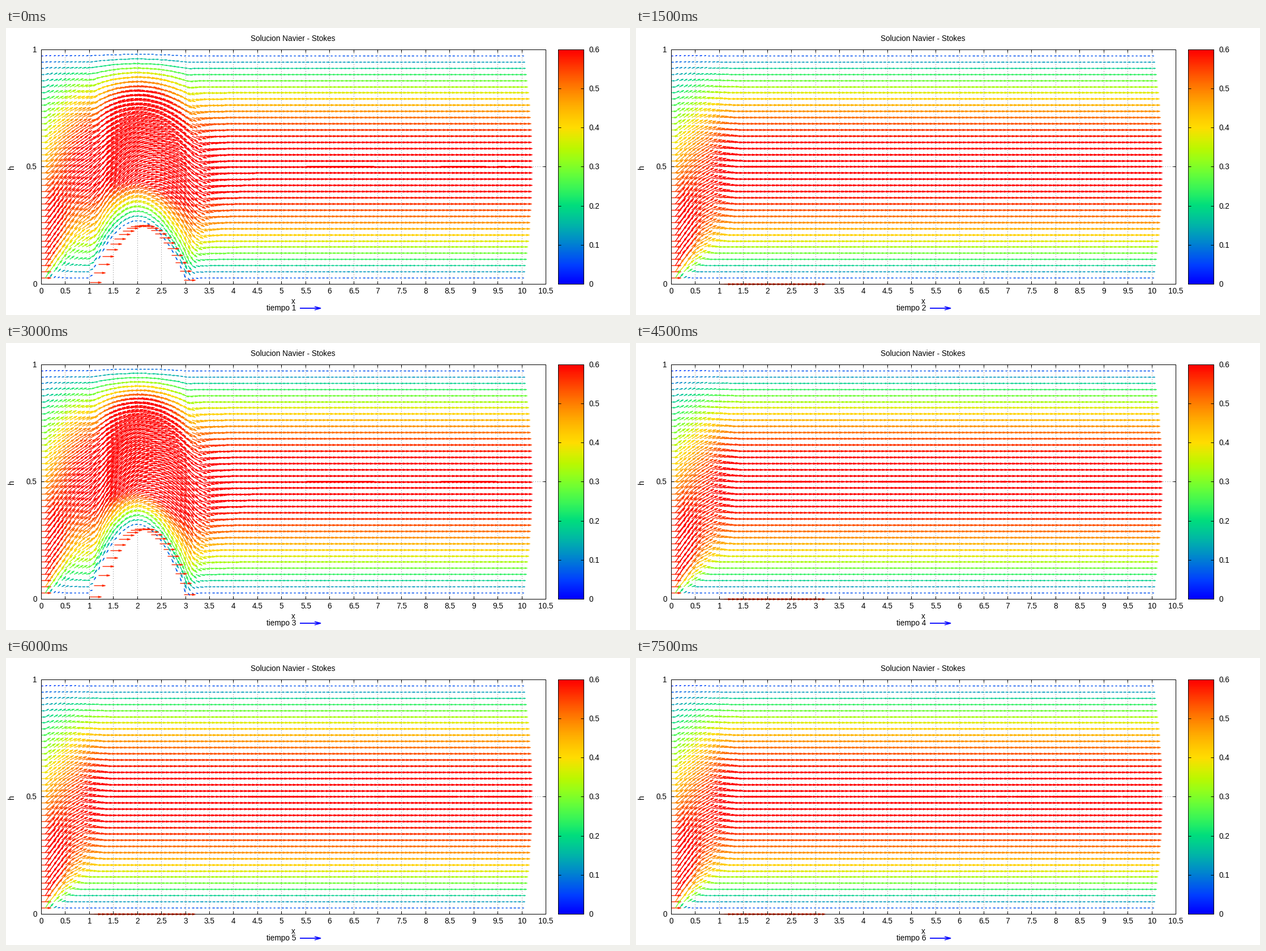
Recreate the animation shown at these times as a matplotlib script. Size 1102 px wide and 508 px high, loop 8 s.

```python
import numpy as np
import matplotlib.pyplot as plt
from matplotlib.animation import FuncAnimation
from matplotlib.collections import LineCollection, PolyCollection
from matplotlib.colors import ListedColormap

W, H, DPI = 1102, 508, 64
PX = 72 / DPI                      # one pixel in points
LEFT, RIGHT, TOP, BASE = 62.5, 953.5, 38.5, 453.5
BAR_L, BAR_R = 975.5, 1020.5
SX, SY = (RIGHT - LEFT) / 10.5, BASE - TOP
ROWS, COLS = 38, 118
U_MAX, S_MAX = 0.625, 0.6
BUMP = {0: 0.25, 2: 0.30}          # obstacle height by time step

# Stretches of the centre line that look solid, in pixels
FLAT = [(190, 310), (428, 548)]
SOLID = [
    [(531, 650), (768, 848), (868, 882), (892, 907)],
    FLAT + [(638, 670), (712, 728), (785, 850)],
    [(531, 650), (768, 866)],
    FLAT + [(646, 654), (680, 686), (709, 717), (738, 752), (785, 885), (899, 922)],
    FLAT + [(655, 664), (678, 798), (814, 826), (848, 915)],
    FLAT + [(638, 654), (670, 712), (735, 850), (863, 872)],
]

plt.rcParams["font.family"] = "Liberation Sans"


def to_x(x):
    return LEFT + SX * x


def to_y(y):
    return BASE - SY * y


def pixel(v):
    """Centre of the pixel that holds v."""
    return np.ceil(v) - 0.5


def palette(speed):
    t = np.clip(np.asarray(speed) / S_MAX, 0, 1)
    rgb = [3 * t - 1, np.sin(np.pi * t), 1.16 - 2 * t]
    return np.clip(np.stack(rgb, axis=-1), 0, 1)


def flow(height):
    """Start points, speeds and on-screen slopes of the channel flow."""
    x, eta = np.meshgrid(np.arange(COLS + 1) * 10 / COLS,
                         np.arange(1, ROWS) / ROWS, indexing="ij")
    over = (x > 1) & (x < 3)
    h = np.where(over, height * (1 - (x - 2) ** 2), 0)
    y = h + eta * (1 - h)
    core = 4 * eta * (1 - eta)
    developed = U_MAX / (1 - h) * core

    # inlet zone: fast low jet that rises and relaxes to the parabola
    reach = 1.35 * (1 - np.exp(-(eta + 0.02) / 0.12))
    settle, bend = (0.7, 1.3) if height else (1, 1)
    inlet = 0.85 * (1 - eta) ** 0.85
    jet = inlet * (1 - np.exp(-eta / 0.045))
    mix = (1 - np.clip(x / reach / settle, 0, 1) ** 1.3) ** 2
    speed = developed + (jet - developed) * mix
    fade = 0.5 + 0.5 * np.cos(np.pi * np.clip(x / reach / bend, 0, 1) ** 1.3)
    slope = np.tan(np.radians(60 * (1 - eta) ** 0.45 * fade))

    # obstacle: the core lags behind the mesh, with tails on both sides
    if height:
        edge = 2 * height * (1 - eta) * SY / SX
        lag = 0.2 * core
        before = slope + 0.25 * edge * core * np.exp(np.minimum(x - 1, 0) / 0.3)
        along = edge * (2 - x + lag)
        entry = np.exp(-np.maximum(x - 1, 0) / 0.12)
        along += (before - along) * entry
        after = edge * (lag - 1) * np.exp(-(x - 3) / (0.06 + 0.18 * core))
        slope = np.where(over, along, np.where(x < 2, before, after))

    speed[0] = np.minimum(inlet[0], 0.57)
    slope[0] = 0
    return x.ravel(), y.ravel(), speed.ravel(), slope.ravel()


def arrows(height):
    x, y, speed, slope = flow(height)
    wall = np.arange(12, 36) * 10 / COLS
    x = np.concatenate([x, wall])
    y = np.concatenate([y, height * (1 - (wall - 2) ** 2)])
    reach = np.concatenate([27 * speed, np.full(wall.size, 18.2)])
    speed = np.concatenate([speed, np.full(wall.size, 0.57)])
    slope = np.concatenate([slope, np.zeros(wall.size)])

    origin = np.column_stack([to_x(x), to_y(y)])
    unit = np.column_stack([np.ones_like(slope), -slope])
    unit /= np.hypot(*unit.T)[:, None]
    length = reach * np.sqrt(1 + slope ** 2) + 1.8
    start = pixel(origin)
    tip = pixel(origin + unit * length[:, None])
    step = tip - start
    size = np.maximum(np.hypot(*step.T), 1)[:, None]
    unit = step / size
    side = unit[:, ::-1] * [-1, 1]
    head = np.minimum(5.5, 0.45 * size)
    back = tip - unit * head
    wing = side * head * 0.3
    shafts = np.stack([start, tip], axis=1)
    heads = np.stack([tip, back + wing, back - wing], axis=1)
    return shafts, heads, palette(speed)


fig = plt.figure(figsize=(W / DPI, H / DPI), dpi=DPI, facecolor="white")
ax = fig.add_axes([0, 0, 1, 1])
ax.axis("off")


def line(xs, ys, width=1, color="black", z=5, **kw):
    kw.setdefault("solid_capstyle", "butt")
    ax.plot(xs, ys, lw=width * PX, color=color, zorder=z, snap=False, **kw)


def label(x, y, text, ha="center", **kw):
    kw.setdefault("va", "baseline")
    return ax.text(x, y, text, ha=ha, fontsize=13.6 * PX, zorder=6, **kw)


def box(x0, x1):
    line([x0, x1, x1, x0, x0], [BASE, BASE, TOP, TOP, BASE],
         solid_joinstyle="miter", solid_capstyle="projecting")


DOTS = dict(color="#a0a0a0", z=1, linestyle=(0, (1.5, 2.5)))
ramp = ListedColormap(palette(np.linspace(0, S_MAX, 256)))
ax.imshow(np.linspace(0, 1, 416)[::-1, None], cmap=ramp, aspect="auto",
          extent=(BAR_L, BAR_R, BASE, TOP), zorder=1)

for k in range(22):
    px = pixel(to_x(k / 2))
    if 0 < k < 21:
        line([px, px], [BASE, TOP], **DOTS)
        line([px, px], [BASE, BASE - 5])
        line([px, px], [TOP, TOP + 5])
    label(px, 470.5, f"{k / 2:g}")

mid = pixel(to_y(0.5))
line([LEFT, RIGHT], [mid, mid], **DOTS)
line([LEFT, LEFT + 5], [mid, mid])
line([RIGHT - 5, RIGHT], [mid, mid])
for v in (0, 0.5, 1):
    label(54.5, to_y(v) + 4.5, f"{v:g}", ha="right")

for k in range(7):
    py = pixel(BASE - SY * k / 6)
    line([BAR_L, BAR_L + 5], [py, py])
    line([BAR_R - 5, BAR_R], [py, py])
    label(1029.5, py + 4.5, f"{k / 10:g}", ha="left")

box(LEFT, RIGHT)
box(BAR_L, BAR_R)
label(507, 23, "Solucion Navier - Stokes")
label(507, 488.5, "x")
label(10, 246, "h", rotation=90, va="center")
clock = label(459.6, 500, "", ha="left")

line([519, 555], [496, 496], 1.8, "blue")
line([545, 556, 545], [493, 496, 499], 1.5, "blue", solid_joinstyle="miter")

shaft_set = LineCollection([], linewidths=1.4 * PX, capstyle="butt",
                           zorder=2, snap=False)
head_set = PolyCollection([], linewidths=0.7 * PX, zorder=3, snap=False)
solid_set = LineCollection([], linewidths=2.8 * PX, colors="red",
                           zorder=4, snap=False)
for part in (shaft_set, head_set, solid_set):
    ax.add_collection(part, autolim=False)
ax.set_xlim(0, W)
ax.set_ylim(H, 0)

fields = {h: arrows(h) for h in (0, 0.25, 0.30)}


def draw(frame):
    step = frame // 3
    shafts, heads, colors = fields[BUMP.get(step, 0)]
    shaft_set.set_segments(shafts)
    shaft_set.set_color(colors)
    head_set.set_verts(heads)
    head_set.set_facecolor(colors)
    head_set.set_edgecolor(colors)
    solid_set.set_segments([[(a, mid), (b, mid)] for a, b in SOLID[step]])
    clock.set_text(f"tiempo {step + 1}")
    return shaft_set, head_set, solid_set, clock


anim = FuncAnimation(fig, draw, frames=16, interval=500, repeat=True,
                     repeat_delay=0, blit=False)
plt.show()
```
